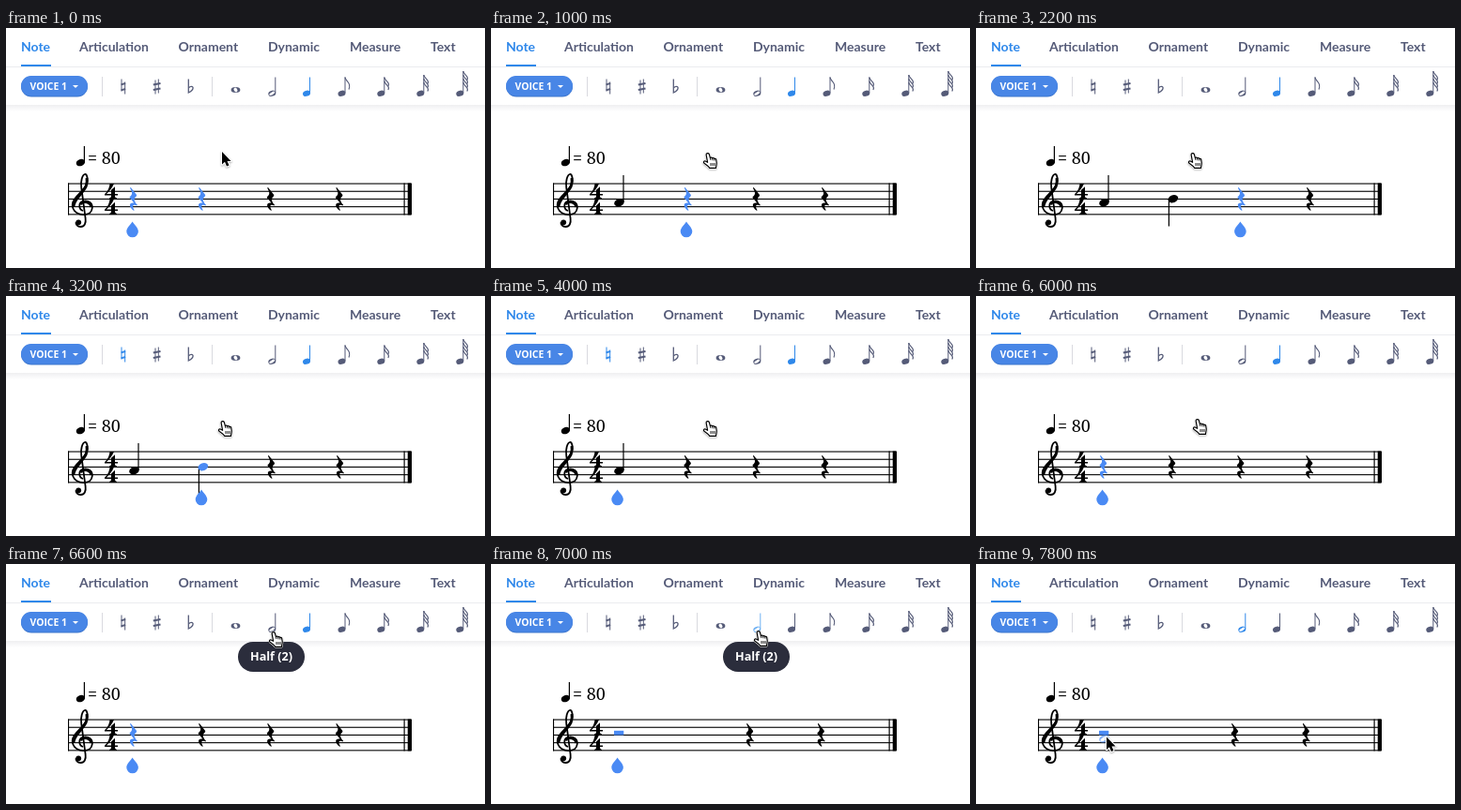
An HTML page with a canvas for the animation above (8000 ms loop, 510 by 256 pixels).

```html
<!DOCTYPE html>
<html lang="en">
<head>
<meta charset="utf-8">
<title>Score editor</title>
<style>
html, body { margin: 0; width: 100%; height: 100%; overflow: hidden; background: #fff; }
canvas { display: block; width: 510px; height: 256px; }
</style>
</head>
<body>
<canvas id="stage"></canvas>
<script>
const W = 510, H = 256, LOOP = 8000;
const BLUE = '#4a8af4', ACTIVE = '#2f88ea', HOVER = '#6fb1f3';
const GREY = '#555b78', INK = '#000';
const canvas = document.getElementById('stage');
const ratio = window.devicePixelRatio || 1;
canvas.width = W * ratio;
canvas.height = H * ratio;
const c = canvas.getContext('2d');

// Each step changes only the named parts of the state.
// Slots: 'r' rest, 'n' note, 'h' half rest, '-' empty; capital = selected.
const steps = [
  [0, { slots: 'RRrr', drop: 0, natural: GREY, half: GREY, quarter: ACTIVE,
        tip: false, ghost: false, cursor: ['arrow', 230, 132] }],
  [400, { slots: 'nRrr', drop: 1 }],
  [600, { cursor: ['hand', 225, 132] }],
  [2200, { slots: 'nnRr', drop: 2 }],
  [3200, { slots: 'nNrr', drop: 1, natural: ACTIVE }],
  [4000, { slots: 'nrrr', drop: 0 }],
  [4200, { slots: 'Nrrr' }],
  [4800, { slots: 'rrrr', natural: '#4375b4' }],
  [5000, { slots: 'Rrrr', natural: GREY }],
  [6000, { cursor: ['hand', 230, 130] }],
  [6200, { cursor: ['hand', 253, 112.5] }],
  [6400, { cursor: ['hand', 272, 81.5] }],
  [6600, { cursor: ['hand', 279, 71], tip: true }],
  [6800, { cursor: ['hand', 279, 70] }],
  [7000, { slots: 'H-rr', half: HOVER, quarter: GREY }],
  [7400, { half: ACTIVE, tip: false, cursor: ['arrow', 217, 185] }],
  [7600, { cursor: ['arrow', 164, 190] }],
  [7800, { cursor: ['arrow', 139, 184.5], ghost: true }]
];

const shapes = {
  rest: 'M-2.3-12.3L3.6-4.8C4-4.2 3.9-3.7 3.4-3.2C.6-.6.8 1.6 4.4 6C4.8 6.6 4.5 7 3.9 6.7C.6 5.2-1.7 6.5 1.2 11.4C1.5 12.2.9 12.5.3 12C-4.6 8.2-4.9 3.2 1 4L-3.3-1C-4-1.8-3.8-2.3-3.2-2.8C-.4-5.2-.8-7.4-3-11.4C-3.3-12.2-2.8-12.8-2.3-12.3Z',
  four: 'M5.5 0H10C8 5 4.5 8.5 2 11H7V6.8L11 3.2V11H14V12.4H11V13.5Q11 15.2 13 15.4V16.4H5V15.4Q7 15.2 7 13.5V12.4H0V11.2C3.5 8 5.2 4 5.5 0Z',
  drop: 'M0-8.5C2-5 6.3-2 6.3 2A6.3 6.3 0 0 1-6.3 2C-6.3-2-2-5 0-8.5Z',
  clef: 'M82 195C77.5 193.5 76.5 186.5 82 184.8C88 183.5 92.3 187 91.8 192C91.2 197.5 86.5 199.3 81.5 199C74 198.6 69.6 193 71 186.5C72.5 180 82.5 174.5 85.7 166.5C87.5 161.5 86.5 156.5 84.5 155.8C81 156 79.3 164 80.2 170L84.6 203C85.4 208.5 83.5 212 79.5 212C76 212 74 209.5 74.6 207',
  clefBold: 'M79.6 188.5C80 186.6 81.5 185.6 83 185.6C87 185.2 90.5 187.5 90.8 191M72 191C71.3 183 82 176.5 85.3 168.5C86.2 166 86.6 163 86 160',
  arrow: 'M0 0V13.6L3 10.8L5 15.6L7.5 14.6L5.5 10H9.6Z',
  hand: 'M4.1 3.2C3.9 1.4 6.7.9 7.3 2.6L8.4 6.7C9 5.8 10.3 6 10.6 6.9C11.2 6.2 12.4 6.5 12.7 7.5C13.3 7 14.5 7.3 14.7 8.4L15.2 11.6C15.4 13.6 14.7 15 14.4 17.3H7.8C6.4 15.3 4.4 14 2 12.3C.7 11 1.8 9.5 3.3 10L5.6 11.3Z',
  fingers: 'M8.4 6.5L8.9 9M10.6 7L11 9.3M12.7 7.6L13 9.6M9 12V15M11 12V15M13 12V15',
  flat: 'M194.3 54.5V69C198 67 199.3 65.5 199.1 63.7C198.8 62 196.4 62 194.3 64'
};
for (const k in shapes) shapes[k] = new Path2D(shapes[k]);

function at(x, y, draw) {
  c.save();
  c.translate(x, y);
  draw();
  c.restore();
}
function fill(shape, x, y, color) {
  at(x, y, () => { c.fillStyle = color; c.fill(shapes[shape]); });
}
function rect(x, y, w, h, color) {
  c.fillStyle = color;
  c.fillRect(x, y, w, h);
}
function line(x1, y1, x2, y2, color, width) {
  c.beginPath();
  c.moveTo(x1, y1);
  c.lineTo(x2, y2);
  c.strokeStyle = color;
  c.lineWidth = width;
  c.stroke();
}
function pill(x, y, w, h, color) {
  c.beginPath();
  c.roundRect(x, y, w, h, h / 2);
  c.fillStyle = color;
  c.fill();
}
function text(s, x, y, font, color) {
  c.font = font;
  c.fillStyle = color;
  c.fillText(s, x, y);
}
function head(x, y, rx, ry, color, hollow) {
  c.beginPath();
  c.ellipse(x, y, rx, ry, -0.35, 0, 7);
  if (hollow) {
    c.closePath();
    c.moveTo(x, y);
    c.ellipse(x, y, rx * 0.82, ry * 0.45, -0.55, 0, 7);
  }
  c.fillStyle = color;
  c.fill('evenodd');
}

function iconNote(x, top, color, flags, hollow) {
  head(x, 69.8, 4.1, 3, color, hollow);
  const sx = x + 3.5;
  line(sx, top, sx, 69, color, 1);
  c.lineWidth = 1.2;
  for (let i = 0; i < flags; i++) {
    const y = top + i * 4;
    c.beginPath();
    c.moveTo(sx, y);
    c.bezierCurveTo(sx + 0.5, y + 4.5, sx + 7, y + 5.5, sx + 4, y + (flags > 1 ? 9.5 : 13));
    c.stroke();
  }
}

function accidentals(natural) {
  line(123, 54.5, 123, 67.5, natural, 1);
  line(126.7, 57.5, 126.7, 70.5, natural, 1);
  for (const y of [59.8, 65.8]) line(122.6, y + 0.6, 127.1, y - 0.8, natural, 2);
  line(159, 55.5, 159, 70.5, GREY, 1);
  line(162.3, 54.5, 162.3, 69.5, GREY, 1);
  for (const y of [59.8, 65.3]) line(156.8, y + 0.8, 164.5, y - 0.8, GREY, 2);
  c.strokeStyle = GREY;
  c.lineWidth = 1.3;
  c.stroke(shapes.flat);
}

function toolbar(s) {
  const tabs = [['Note', 16], ['Articulation', 78], ['Ornament', 183.5],
                ['Dynamic', 279], ['Measure', 366], ['Text', 452]];
  tabs.forEach(([name, x], i) =>
    text(name, x, 25, 'bold 14px Lato, sans-serif', i ? GREY : ACTIVE));
  rect(0, 41, W, 1, '#ebecef');
  rect(16, 39, 32, 2, ACTIVE);

  const shade = c.createLinearGradient(0, 82, 0, 89);
  shade.addColorStop(0, '#efeff1');
  shade.addColorStop(1, '#fff');
  rect(0, 82, W, 7, shade);

  pill(16, 51.5, 71, 22, '#3d76cd');
  pill(16, 51, 71, 21.5, '#4886e6');
  text('VOICE 1', 25.5, 66, 'bold 10.4px "Open Sans", sans-serif', '#fff');
  c.beginPath();
  c.moveTo(71, 61);
  c.lineTo(77, 61);
  c.lineTo(74, 64);
  c.fill();
  rect(102, 52, 1, 21, '#d9dadf');
  rect(219, 52, 1, 21, '#d9dadf');

  accidentals(s.natural);
  c.beginPath();
  c.ellipse(244.5, 66, 4.9, 3, 0, 0, 7);
  c.closePath();
  c.moveTo(244.5, 66);
  c.ellipse(244.5, 66, 2.5, 1.7, 1, 0, 7);
  c.fillStyle = GREY;
  c.fill('evenodd');
  iconNote(283.3, 52.5, s.half, 0, true);
  iconNote(320, 52.5, s.quarter, 0);
  iconNote(357.5, 52.5, GREY, 1);
  iconNote(399.3, 52.5, GREY, 2);
  iconNote(441.3, 50, GREY, 3);
  iconNote(483.3, 46, GREY, 4);
}

function staff() {
  for (let i = 0; i < 5; i++) rect(66, 165.5 + i * 8.2, 365, 1.1, INK);
  rect(66, 165.5, 1.1, 33.9, INK);
  rect(423.5, 165.5, 1.2, 33.9, INK);
  rect(427.7, 165.5, 4.3, 33.9, INK);

  c.strokeStyle = INK;
  c.lineWidth = 1.8;
  c.stroke(shapes.clef);
  c.lineWidth = 3;
  c.stroke(shapes.clefBold);
  c.beginPath();
  c.arc(77.2, 207.3, 2.9, 0, 7);
  c.fillStyle = INK;
  c.fill();
  fill('four', 105, 166, INK);
  fill('four', 105, 182.6, INK);

  head(79.4, 143.6, 4.8, 3.6, INK);
  line(83.4, 126, 83.4, 143, INK, 1.2);
  text('= 80', 87, 145.3, '18px "Noto Serif", serif', INK);
}

function slot(kind, i, s) {
  const type = kind.toLowerCase();
  const color = kind === type ? INK : BLUE;
  if (type === 'r') {
    const shift = /n/i.test(s.slots) ? 0.7 : 0;
    const x = s.slots[0] === 'H' ? 275.3 + (i - 2) * 75.8 : 135.3 + i * 73.1 + shift;
    fill('rest', x, 182.6, color);
  } else if (type === 'h') {
    rect(131, 177.8, 10.3, 4.7, color);
  } else if (type === 'n') {
    if (i === 0) {
      line(141, 157, 141, 185, INK, 1.2);
      head(136.5, 186.2, 5.5, 4, color);
    } else {
      line(205.4, 183, 205.4, 211.5, INK, 1.2);
      head(209.8, 182.2, 5.5, 4, color);
    }
  }
}

function pointer([kind, x, y]) {
  at(x, y, () => {
    const hand = kind === 'hand';
    c.lineJoin = 'round';
    c.shadowColor = 'rgba(0,0,0,.3)';
    c.shadowBlur = 2 * ratio;
    c.shadowOffsetY = ratio;
    c.strokeStyle = '#fff';
    c.lineWidth = 2.2;
    c.stroke(shapes[kind]);
    c.shadowColor = 'transparent';
    c.fillStyle = hand ? '#fff' : INK;
    c.fill(shapes[kind]);
    if (!hand) return;
    c.strokeStyle = INK;
    c.lineWidth = 1.2;
    c.stroke(shapes.hand);
    c.lineWidth = 0.9;
    c.stroke(shapes.fingers);
  });
}

function draw(t) {
  const s = {};
  for (const [start, change] of steps) if (start <= t) Object.assign(s, change);
  c.setTransform(ratio, 0, 0, ratio, 0, 0);
  rect(0, 0, W, H, '#fff');
  toolbar(s);
  staff();
  [...s.slots].forEach((kind, i) => slot(kind, i, s));
  if (s.ghost) {
    c.globalAlpha = 0.65;
    head(136.5, 186.4, 5.5, 4, BLUE, true);
    c.globalAlpha = 1;
  }
  fill('drop', 134.6 + s.drop * 73.4, 215, BLUE);
  if (s.tip) {
    pill(247, 83, 71, 32, '#2b2d3c');
    c.textAlign = 'center';
    text('Half (2)', 282.5, 103, 'bold 12.6px "Open Sans", sans-serif', '#fff');
    c.textAlign = 'left';
  }
  pointer(s.cursor);
}

const begin = performance.now();
function tick() {
  draw((performance.now() - begin) % LOOP);
  requestAnimationFrame(tick);
}
tick();
</script>
</body>
</html>
```
